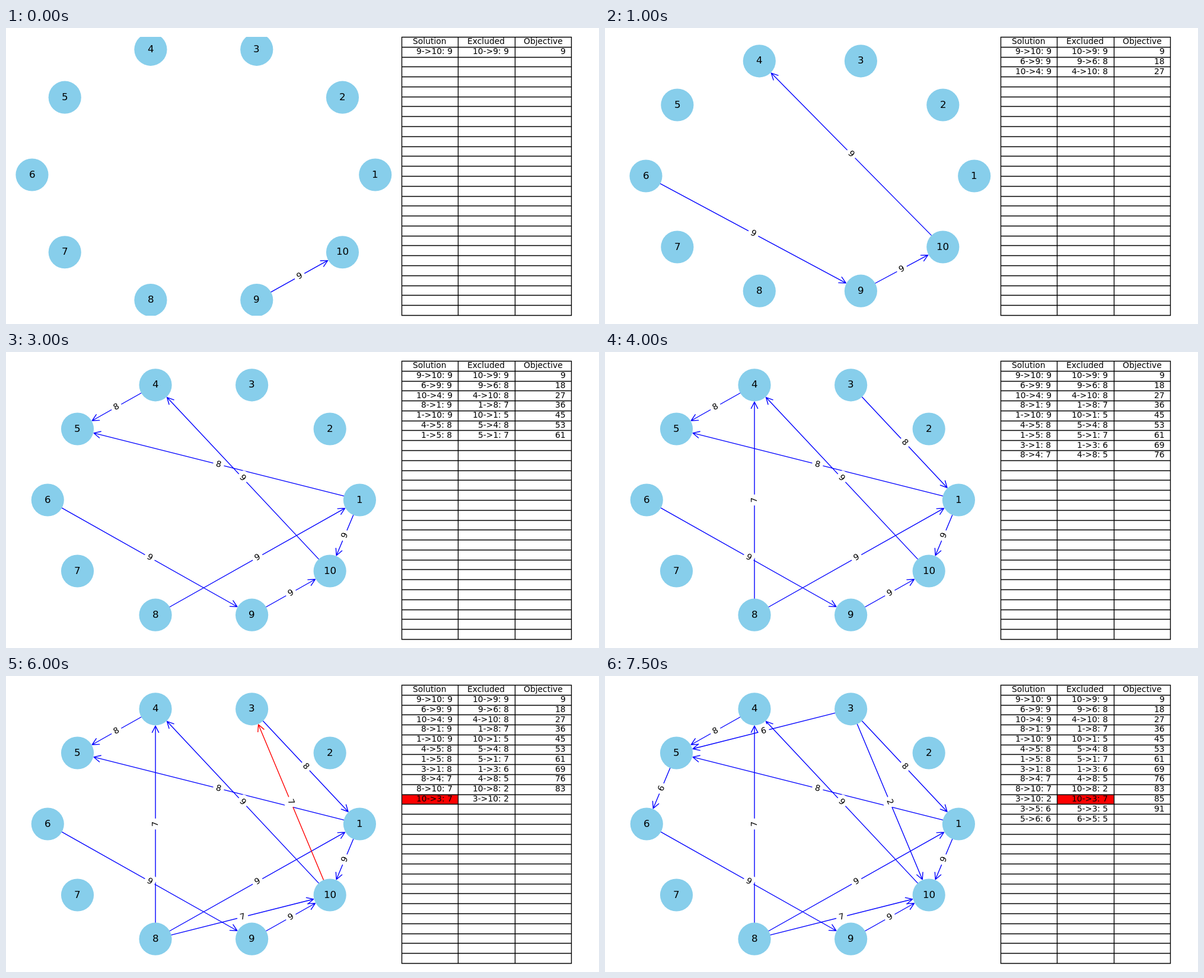
Write an HTML page with a canvas that moves like this. It is 1000x500 px and loops after 8 s.

```html
<!DOCTYPE html>
<html lang="en">
<head>
<meta charset="utf-8">
<title>Ranking graph</title>
<style>
  html, body { margin: 0; width: 100%; height: 100%; overflow: hidden; background: #fff; }
  canvas { display: block; }
</style>
</head>
<body>
<canvas id="stage" width="1000" height="500"></canvas>
<script>
const ctx = document.getElementById('stage').getContext('2d');
const PT = 100 / 72;
const LINE = PT;
const STEP_MS = 500, LOOP_MS = 8000;
const NODE_R = Math.sqrt(1500) / 2 * PT;
const PLOT = { x: 15, y: 15, w: 636.67, h: 470 };
const TABLE = { x: 666.7, y: 15, col: 95.5, row: 470 / 28, rows: 28 };

// from, to, weight, weight of the opposite edge
const CHOICES = [
  [9, 10, 9, 9], [6, 9, 9, 8], [10, 4, 9, 8], [8, 1, 9, 7], [1, 10, 9, 5],
  [4, 5, 8, 8], [1, 5, 8, 7], [3, 1, 8, 6], [8, 4, 7, 5], [8, 10, 7, 2],
  [10, 3, 7, 2], [3, 5, 6, 5], [5, 6, 6, 5]
];
const CONFLICT = 10;
const CYCLE = [4, 7, CONFLICT];

const nodes = Array.from({ length: 10 }, (_, i) => {
  const a = i * Math.PI / 5;
  return { x: Math.cos(a), y: Math.sin(a) };
});

function stateAt(step) {
  const count = step <= 10 ? step + 1 : step < 14 ? 11 : step - 2;
  const choices = CHOICES.slice(0, count);
  const flipped = step >= 13;
  if (flipped) {
    const [a, b, w, back] = choices[CONFLICT];
    choices[CONFLICT] = [b, a, back, w];
  }
  return {
    choices,
    red: step === 11 ? CYCLE : step === 12 ? [CONFLICT] : [],
    redCol: flipped ? 1 : step === 12 ? 0 : -1,
    pending: (step >= 10 && step <= 12) || step === 15
  };
}

// Axis range: all nodes, the edges padded by 5 %, then a 5 % margin
function axisRange(choices, axis) {
  const all = nodes.map(n => n[axis]);
  const used = choices.flatMap(([a, b]) => [all[a - 1], all[b - 1]]);
  const lo = Math.min(...used), hi = Math.max(...used), pad = (hi - lo) * 0.05;
  const min = Math.min(...all, lo - pad), max = Math.max(...all, hi + pad);
  const margin = (max - min) * 0.05;
  return [min - margin, max + margin];
}

function layout(choices) {
  const [x0, x1] = axisRange(choices, 'x');
  const [y0, y1] = axisRange(choices, 'y');
  return nodes.map(n => ({
    x: PLOT.x + (n.x - x0) / (x1 - x0) * PLOT.w,
    y: PLOT.y + (y1 - n.y) / (y1 - y0) * PLOT.h
  }));
}

function setFont(points) {
  ctx.font = `${points * PT}px "DejaVu Sans", sans-serif`;
  ctx.fillStyle = '#000';
}

// align: 0 left, 0.5 centre, 1 right
function drawText(text, x, y, points, align) {
  setFont(points);
  const left = x - ctx.measureText(text).width * align;
  ctx.fillText(text, Math.round(left), Math.round(y + points * 0.39));
}

function drawArrow(p, q, color) {
  const angle = Math.atan2(q.y - p.y, q.x - p.x);
  const tip = Math.hypot(q.x - p.x, q.y - p.y) - NODE_R - LINE * 0.5 * Math.sqrt(5);
  const headLength = 8 * PT, headWidth = 4 * PT;
  ctx.save();
  ctx.translate(p.x, p.y);
  ctx.rotate(angle);
  ctx.strokeStyle = color;
  ctx.lineCap = ctx.lineJoin = 'round';
  ctx.beginPath();
  ctx.moveTo(NODE_R, 0);
  ctx.lineTo(tip, 0);
  ctx.moveTo(tip - headLength, -headWidth);
  ctx.lineTo(tip, 0);
  ctx.lineTo(tip - headLength, headWidth);
  ctx.stroke();
  ctx.restore();
}

function drawWeight(p, q, weight) {
  let angle = Math.atan2(q.y - p.y, q.x - p.x);
  const quarter = Math.PI / 2 + 1e-6;
  if (angle > quarter) angle -= Math.PI;
  if (angle < -quarter) angle += Math.PI;
  ctx.save();
  ctx.translate((p.x + q.x) / 2, (p.y + q.y) / 2);
  ctx.rotate(angle);
  setFont(10);
  const textW = ctx.measureText(weight).width;
  const pad = 3 * PT + LINE / 2;
  const w = textW + 2 * pad, h = 13.5 + 2 * pad;
  ctx.fillStyle = '#fff';
  ctx.beginPath();
  ctx.roundRect(-w / 2, -h / 2, w, h, pad);
  ctx.fill();
  ctx.fillStyle = '#000';
  ctx.fillText(weight, -textW / 2, 3.9);
  ctx.restore();
}

function drawGraph({ choices, red }) {
  const pos = layout(choices);
  const ends = ([a, b]) => [pos[a - 1], pos[b - 1]];
  choices.forEach((c, i) => drawArrow(...ends(c), red.includes(i) ? '#f00' : '#00f'));
  choices.forEach(c => drawWeight(...ends(c), String(c[2])));

  ctx.save();
  ctx.beginPath();
  ctx.rect(PLOT.x, PLOT.y, PLOT.w, PLOT.h + 1);
  ctx.clip();
  ctx.fillStyle = '#87ceeb';
  for (const p of pos) {
    ctx.beginPath();
    ctx.arc(p.x, p.y, NODE_R + LINE / 2, 0, 2 * Math.PI);
    ctx.fill();
  }
  ctx.restore();
  pos.forEach((p, i) => drawText(String(i + 1), p.x, p.y, 12, 0.5));
}

const colX = i => Math.floor(TABLE.x + 0.5 + TABLE.col * i) + 0.5;
const rowY = i => Math.floor(TABLE.y + 0.46 + TABLE.row * i) + 0.5;

function drawCell(text, row, col, align) {
  const inset = align === 1 ? 0.9 : 0.5;
  drawText(text, TABLE.x + TABLE.col * (col + inset),
    TABLE.y + TABLE.row * (row + 0.5), 10, align);
}

function drawTable({ choices, redCol, pending }) {
  if (redCol >= 0) {
    const x = colX(redCol), y = rowY(CONFLICT + 1);
    ctx.fillStyle = '#f00';
    ctx.fillRect(x, y, colX(redCol + 1) - x, rowY(CONFLICT + 2) - y);
  }
  ctx.strokeStyle = '#000';
  ctx.lineCap = 'square';
  ctx.beginPath();
  for (let i = 0; i <= TABLE.rows; i++) {
    ctx.moveTo(colX(0), rowY(i));
    ctx.lineTo(colX(3), rowY(i));
  }
  for (let i = 0; i <= 3; i++) {
    ctx.moveTo(colX(i), rowY(0));
    ctx.lineTo(colX(i), rowY(TABLE.rows));
  }
  ctx.stroke();

  ['Solution', 'Excluded', 'Objective'].forEach((t, i) => drawCell(t, 0, i, 0.5));
  let total = 0;
  choices.forEach(([a, b, weight, back], i) => {
    total += weight;
    drawCell(`${a}->${b}: ${weight}`, i + 1, 0, 1);
    drawCell(`${b}->${a}: ${back}`, i + 1, 1, 1);
    if (!pending || i < choices.length - 1) drawCell(String(total), i + 1, 2, 1);
  });
}

let shown = -1;
function tick(now) {
  const step = Math.floor(now % LOOP_MS / STEP_MS);
  if (step !== shown) {
    shown = step;
    const state = stateAt(step);
    ctx.fillStyle = '#fff';
    ctx.fillRect(0, 0, 1000, 500);
    ctx.lineWidth = LINE;
    drawGraph(state);
    drawTable(state);
  }
  requestAnimationFrame(tick);
}
tick(performance.now());
</script>
</body>
</html>
```
